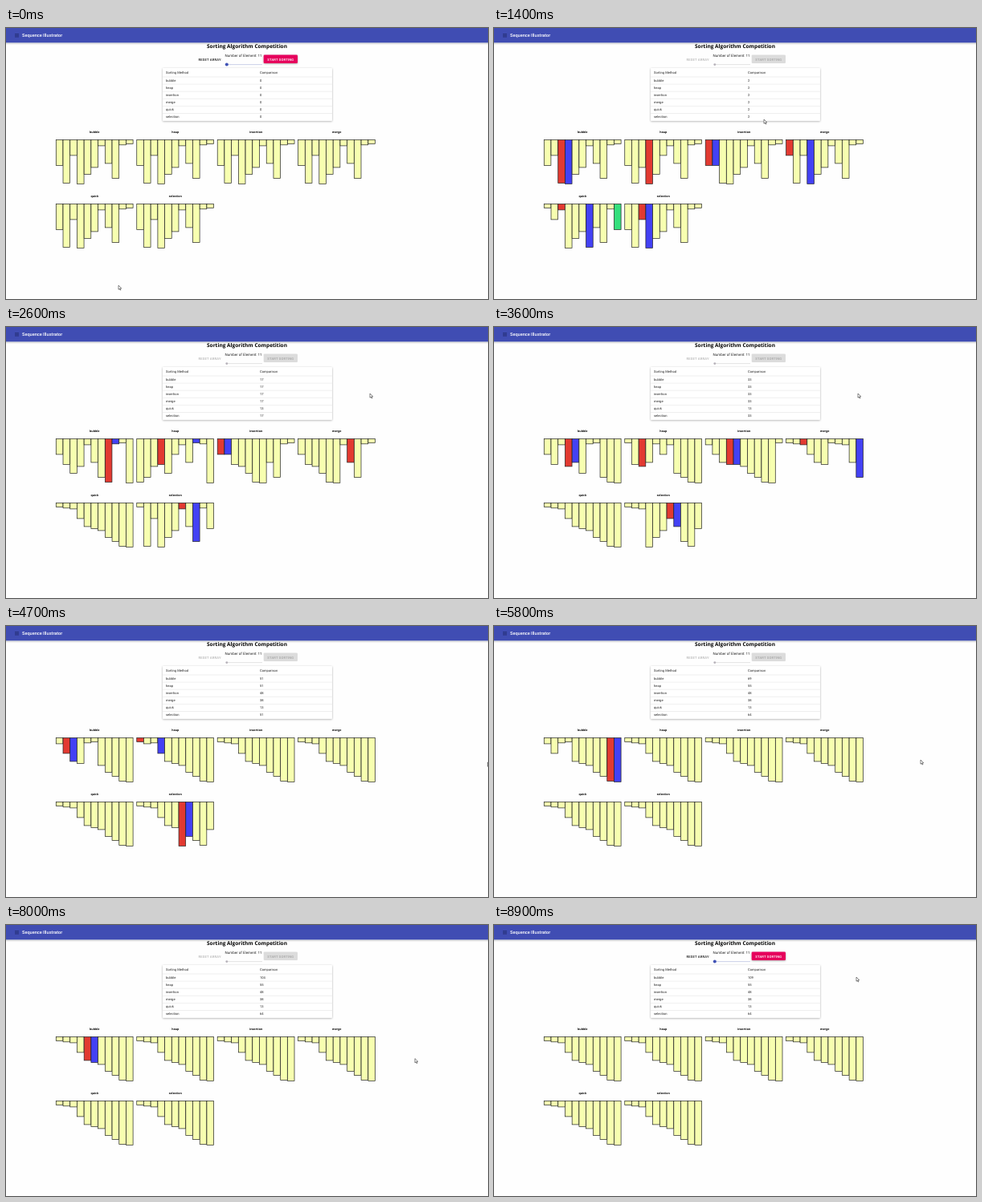
An HTML page that plays this animation: 600 px wide and 338 px high, repeating every 9000 ms.

```html
<!DOCTYPE html>
<html lang="en">
<head>
<meta charset="utf-8">
<title>Sorting Algorithm Competition</title>
<style>
html, body { margin: 0; width: 100%; height: 100%; overflow: hidden; background: #fefefe; }
svg { display: block; width: 100vw; height: 100vh; }
text { font-family: Roboto, sans-serif; font-size: 4.1px; fill: #222; text-rendering: geometricPrecision; }
.title, .label { font-family: "Open Sans", sans-serif; font-weight: 700; text-anchor: middle; fill: #000; }
.title { font-size: 6.52px; }
.label { font-size: 3.6px; }
.button { font-size: 4.25px; font-weight: 500; letter-spacing: .028em; text-anchor: middle; }
</style>
</head>
<body>
<svg id="stage" viewBox="0 0 600 338">
  <defs>
    <filter id="shadow" x="-10%" y="-20%" width="120%" height="160%">
      <feDropShadow dx="0" dy=".7" stdDeviation=".8" flood-opacity=".35"/>
    </filter>
  </defs>
  <rect width="600" height="338" fill="#fefefe"/>
  <rect x="-9" y="-9" width="618" height="27.2" fill="#3f4db3" filter="url(#shadow)"/>
  <path d="M11 7.6h5M11 9.3h5M11 11h5" stroke="#1c2560" stroke-width=".7"/>
  <text x="20" y="11.2" style="font-size:5.6px;font-weight:500;fill:#fff">Sequence Illustrator</text>
  <text class="title" x="300" y="25.4">Sorting Algorithm Competition</text>
  <text id="reset" class="button" x="253.6" y="40.5">RESET ARRAY</text>
  <text x="295.6" y="36.4" style="font-size:4.5px;text-anchor:middle">Number of Element: 11</text>
  <path id="track" d="M274.5 45.6H319" stroke-width=".6"/>
  <circle id="thumb" cx="274.8" cy="45.6"/>
  <rect id="startBox" x="320.7" y="33.6" width="42.3" height="10.4" rx="1.2"/>
  <text id="start" class="button" x="341.8" y="40.5">START SORTING</text>
  <rect x="195" y="50" width="211" height="65.8" rx="1" fill="#fff" filter="url(#shadow)"/>
  <g id="table"></g>
  <g id="charts"></g>
  <path id="cursor" d="M0 0V5.2L1.3 4.1 2.2 6 3 5.6 2.2 3.8 3.8 3.7Z" fill="#fff" stroke="#222" stroke-width=".55"/>
</svg>
<script>
const LOOP = 9000, FRAME = 100, START = 1200;
const SIZES = [5, 6.4, 7.5, 19.5, 29.5, 32, 34.5, 43, 48.2, 54.1, 55];
const INITIAL = [5, 9, 3, 10, 7, 6, 2, 4, 8, 1, 0];
const SORTED = SIZES.map((_, i) => i);
const N = INITIAL.length;
const COLORS = { bar: "#f7ffb0", red: "#e23a31", blue: "#4341f4", green: "#35df7d" };

// [time, step] and [time, x, y]
const PACE = [[1240, 0], [1400, 2.3], [2600, 17.5], [3600, 33.4], [4700, 51.4], [7200, 91.4], [8360, 110]];
const POINTER = [[0, 140, 321], [300, 140, 321], [900, 342, 39], [1150, 342, 39], [1400, 336, 114],
  [1900, 449, 90], [2100, 453, 83], [4150, 453, 83], [4600, 599.5, 170], [4800, 599.5, 170], [5100, 547, 168],
  [5800, 531, 167], [6300, 531, 167], [6800, 509, 166.6], [8100, 509, 166.6], [8700, 451, 65]];

function swap(a, i, j) { [a[i], a[j]] = [a[j], a[i]]; }

const sorts = {
  bubble(a, snap) {
    for (let pass = 0; pass < N; pass++)
      for (let j = 0; j < N - 1; j++) {
        snap(j, j + 1);
        if (a[j] > a[j + 1]) swap(a, j, j + 1);
      }
  },
  heap(a, snap) {
    function sift(i, end) {
      let top = i;
      for (const child of [2 * i + 1, 2 * i + 2])
        if (child < end && a[child] > a[top]) snap(top = child);
      if (top === i) return;
      swap(a, i, top);
      snap(i, top);
      sift(top, end);
    }
    for (let i = N >> 1; i >= 0; i--) sift(i, N);
    for (let end = N - 1; end > 0; end--) {
      swap(a, 0, end);
      snap(0, end);
      sift(0, end);
    }
  },
  insertion(a, snap) {
    for (let i = 1; i < N; i++) {
      const key = a[i];
      let j = i - 1;
      for (; j >= 0 && a[j] > key; j--) {
        a[j + 1] = a[j];
        snap(j, j + 1);
      }
      a[j + 1] = key;
      snap(j + 1);
    }
  },
  merge(a, snap, lo = 0, hi = N - 1) {
    if (lo >= hi) return;
    const mid = (lo + hi) >> 1;
    sorts.merge(a, snap, lo, mid);
    sorts.merge(a, snap, mid + 1, hi);
    const copy = a.slice();
    let i = lo, j = mid + 1;
    for (let k = lo; k <= hi; k++) {
      const both = i <= mid && j <= hi;
      const takeLeft = both ? copy[i] <= copy[j] : i <= mid;
      a[k] = copy[takeLeft ? i++ : j++];
      if (both) snap(i, j); else snap(k);
    }
  },
  quick(a, snap, lo = 0, hi = N - 1) {
    if (lo >= hi) return;
    let i = lo;
    for (let j = lo; j < hi; j++)
      if (a[j] < a[hi]) {
        swap(a, i, j);
        snap(i++, j, hi);
      }
    swap(a, i, hi);
    snap(i, hi, hi);
    sorts.quick(a, snap, lo, i - 1);
    sorts.quick(a, snap, i + 1, hi);
  },
  selection(a, snap) {
    for (let i = 0; i < N - 1; i++) {
      let min = i;
      for (let j = i + 1; j < N; j++) {
        snap(min, j);
        if (a[j] < a[min]) min = j;
      }
      swap(a, i, min);
      snap(i, min);
    }
  }
};

function record(sort) {
  const a = INITIAL.slice(), steps = [];
  sort(a, (red, blue, green) => steps.push({ a: a.slice(), red, blue, green }));
  return steps;
}

const byId = id => document.getElementById(id);
function add(parent, tag, attrs, text = "") {
  const el = document.createElementNS("http://www.w3.org/2000/svg", tag);
  for (const name in attrs) el.setAttribute(name, attrs[name]);
  el.textContent = text;
  parent.append(el);
  return el;
}
function set(id, attrs) {
  for (const name in attrs) byId(id).setAttribute(name, attrs[name]);
}

const table = byId("table");
add(table, "text", { x: 199, y: 57.3 }, "Sorting Method");
add(table, "text", { x: 316, y: 57.3 }, "Comparison");

const lanes = Object.entries(sorts).map(([name, sort], n) => {
  const rowY = 66.9 + 9.1 * n;
  const left = 62.3 + 100.45 * (n % 4), top = n < 4 ? 139.4 : 219.4;
  add(table, "path", { d: `M195 ${rowY - 5.9}H406`, stroke: "#dedede", "stroke-width": .5 });
  add(table, "text", { x: 199, y: rowY }, name);
  const count = add(table, "text", { x: 316, y: rowY });
  add(byId("charts"), "text", { class: "label", x: left + 48, y: top - 8.2 }, name);
  const bars = INITIAL.map((_, i) => add(byId("charts"), "rect",
    { x: left + 8.72 * i, y: top, width: 8.6, stroke: "#222", "stroke-width": .7 }));
  return { steps: record(sort), count, bars };
});

function along(keys, t) {
  const next = keys.findIndex(key => key[0] > t);
  if (next === 0) return keys[0].slice(1);
  if (next < 0) return keys[keys.length - 1].slice(1);
  const from = keys[next - 1], to = keys[next];
  const p = (t - from[0]) / (to[0] - from[0]);
  return from.slice(1).map((v, i) => v + (to[i + 1] - v) * p);
}

function drawLane({ steps, count, bars }, step, started) {
  const state = !started ? { a: INITIAL } : steps[step] || { a: SORTED };
  count.textContent = Math.min(step, steps.length - 1);
  bars.forEach((bar, i) => {
    const role = ["red", "green", "blue"].find(key => state[key] === i) || "bar";
    bar.setAttribute("height", SIZES[state.a[i]]);
    bar.setAttribute("fill", COLORS[role]);
  });
}

function draw(t) {
  const step = Math.floor(along(PACE, t)[0]);
  const busy = t >= START && step < lanes[0].steps.length;
  for (const lane of lanes) drawLane(lane, step, t >= PACE[0][0]);
  byId("reset").style.fill = busy ? "#b8b8b8" : "#222";
  byId("start").style.fill = busy ? "#a8a8a8" : "#fff";
  set("startBox", { fill: busy ? "#dcdcdc" : "#e6005c", filter: busy ? "none" : "url(#shadow)" });
  set("track", { stroke: busy ? "#d0d0d0" : "#a9b2dc" });
  set("thumb", { fill: busy ? "#b5b0b8" : "#3f51b5", r: busy ? 1.4 : 2 });
  set("cursor", { transform: `translate(${along(POINTER, t)})` });
}

function tick(now) {
  draw(Math.floor((now % LOOP) / FRAME) * FRAME);
  requestAnimationFrame(tick);
}
draw(0);
requestAnimationFrame(tick);
</script>
</body>
</html>
```
